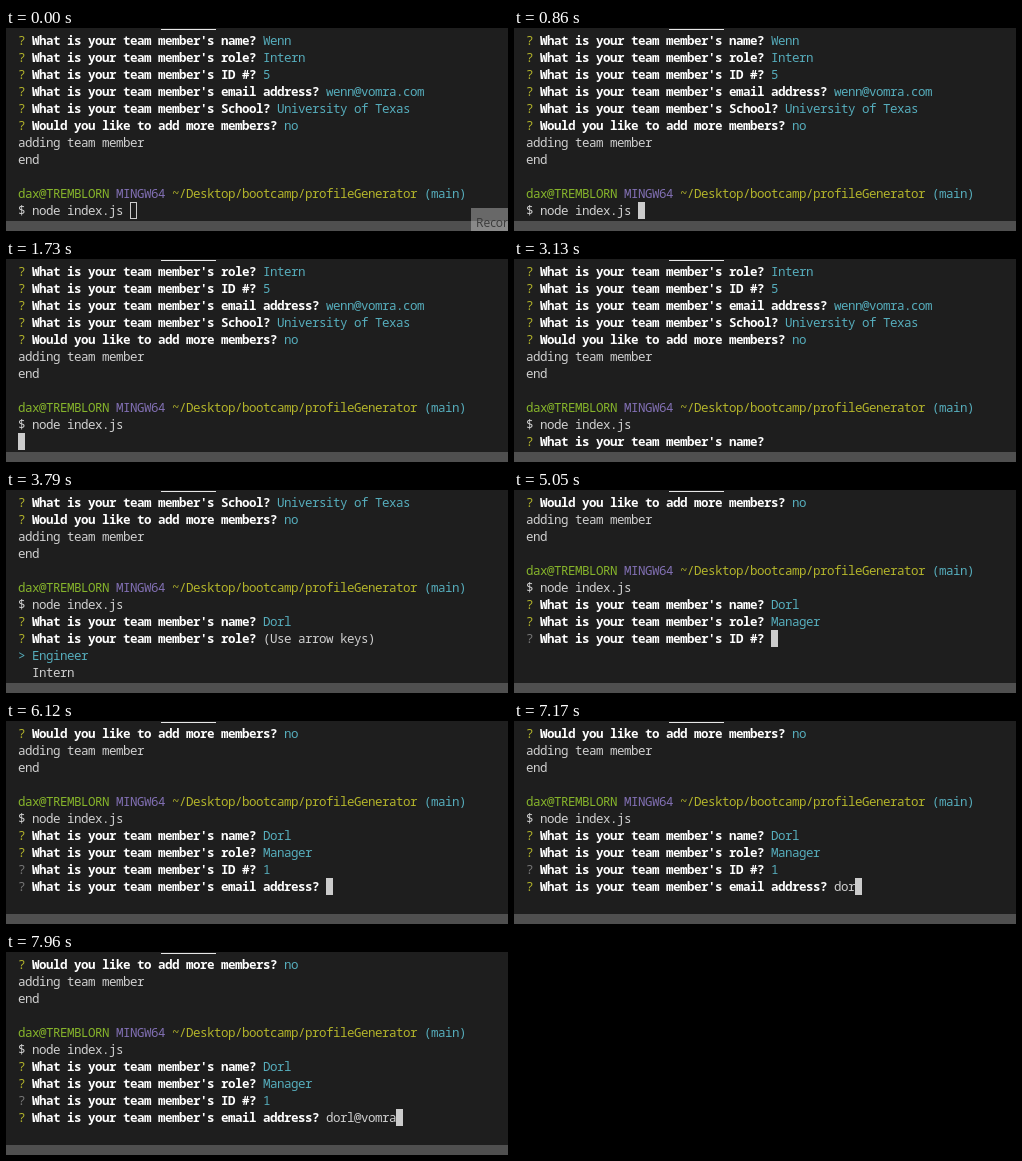
An HTML page for the animation above (8000 ms loop, 502x203 px).

```html
<!DOCTYPE html>
<html lang="en">
<head>
<meta charset="utf-8">
<title>Terminal session</title>
<style>
  html, body { margin: 0; width: 100%; height: 100%; overflow: hidden; background: #1e1e1e; }
  #stage { position: relative; width: 502px; height: 203px; overflow: hidden; background: #1e1e1e; }
  #tab { position: absolute; left: 155px; top: 1px; width: 55px; height: 1px; background: #e7e7e7; }
  #bar { position: absolute; left: 0; top: 193px; width: 502px; height: 10px; background: #4f4f4f; }
  #tip { position: absolute; left: 465px; top: 180px; width: 37px; height: 23px; overflow: hidden;
         background: rgba(255, 255, 255, .33); color: #3a3a3a;
         font: 12px/29px "Open Sans", sans-serif; text-indent: 5px; }
  #term { position: absolute; left: 12px; top: 4px; width: 490px; height: 187px; overflow: hidden;
          color: #d0d0d0; font: 500 12.5px/17px "Noto Sans Mono", monospace;
          letter-spacing: calc(7px - 1ch); }
  #term div { height: 17px; white-space: pre; }
  b { color: #fff; font-weight: 700; }
  .g { color: #86b42b; }
  .y { color: #b3b42b; }
  .c { color: #56adbc; }
  .m { color: #8270b4; }
  .d { color: #777; }
  i { display: inline-block; box-sizing: border-box; width: 7px; height: 17px; vertical-align: top;
      border: 1px solid #ccc; }
  i.on { background: #ccc; }
</style>
</head>
<body>
<div id="stage">
  <div id="tab"></div>
  <div id="term"></div>
  <div id="bar"></div>
  <div id="tip">Record</div>
</div>
<script>
const LOOP = 8000, ROWS = 11;
const term = document.getElementById('term');
const tip = document.getElementById('tip');

const span = (cls, s) => `<span class="${cls}">${s}</span>`;
const cyan = s => span('c', s);
const ask = (text, answer = '', mark = 'y') => `${span(mark, '?')} <b>${text}</b> ${answer}`;
const member = (what, answer, mark) => ask(`What is your team member's ${what}?`, answer, mark);
const CURSOR = '<i class="on"></i>', HOLLOW = '<i></i>';

const history = [
  member('name', cyan('Wenn')),
  member('role', cyan('Intern')),
  member('ID #', cyan('5')),
  member('email address', cyan('wenn@vomra.com')),
  member('School', cyan('University of Texas')),
  ask('Would you like to add more members?', cyan('no')),
  'adding team member',
  'end',
  '',
  `${span('g', 'dax@TREMBLORN')} ${span('m', 'MINGW64')} ` +
    `${span('y', '~/Desktop/bootcamp/profileGenerator')} ${cyan('(main)')}`
];
const command = '$ node index.js ';
const named = [command, member('name', cyan('Dorl'))];
const managed = [...named, member('role', cyan('Manager'))];
const identified = [...managed, member('ID #', cyan('1'), 'd')];

const options = (picked, count = 3) => ['Engineer', 'Intern', 'Manager'].slice(0, count)
  .map((s, i) => i === picked ? cyan('&gt; ' + s) : '  ' + s);
const roles = (picked, hint, count) => [...named, member('role', hint), ...options(picked, count)];
const HINT = '(Use arrow keys)';

// Each step: start time, first visible line, lines after the history.
const steps = [
  [0, 0, [command + HOLLOW]],
  [860, 0, [command + CURSOR]],
  [1730, 1, [command, CURSOR]],
  [2400, 1, [command, member('name')]],
  [2470, 1, [command, member('name', CURSOR)]],
  [3130, 1, [command, member('name')]]
];

function type(word, times, first, lines, what) {
  times.forEach((t, i) =>
    steps.push([t, first, [...lines, member(what, word.slice(0, i + 1) + CURSOR)]]));
}

type('Dorl', [3200, 3400, 3500, 3590], 1, [command], 'name');
steps.push(
  [3790, 4, roles(0, HINT, 2)],
  [3860, 5, roles(0, HINT)],
  [4790, 5, roles(1)],
  [4990, 5, roles(2)],
  [5050, 5, [...managed, member('ID #', CURSOR, 'd')]],
  [5780, 5, [...managed, member('ID #', '1' + CURSOR, 'd')]],
  [6120, 5, [...identified, member('email address', CURSOR, 'd')]],
  [6910, 5, [...identified, member('email address')]]
);
type('dorl@vomra', [6980, 7060, 7130, 7260, 7430, 7630, 7700, 7770, 7860, 7960],
  5, identified, 'email address');

let shown;
function render(t) {
  tip.hidden = t >= 70;
  const step = steps.findLast(s => s[0] <= t);
  if (step === shown) return;
  shown = step;
  const [, first, lines] = step;
  term.innerHTML = [...history, ...lines].slice(first, first + ROWS)
    .map(s => `<div>${s}</div>`).join('');
}

const start = performance.now();
function tick() {
  render((performance.now() - start) % LOOP);
  requestAnimationFrame(tick);
}
tick();
</script>
</body>
</html>
```
